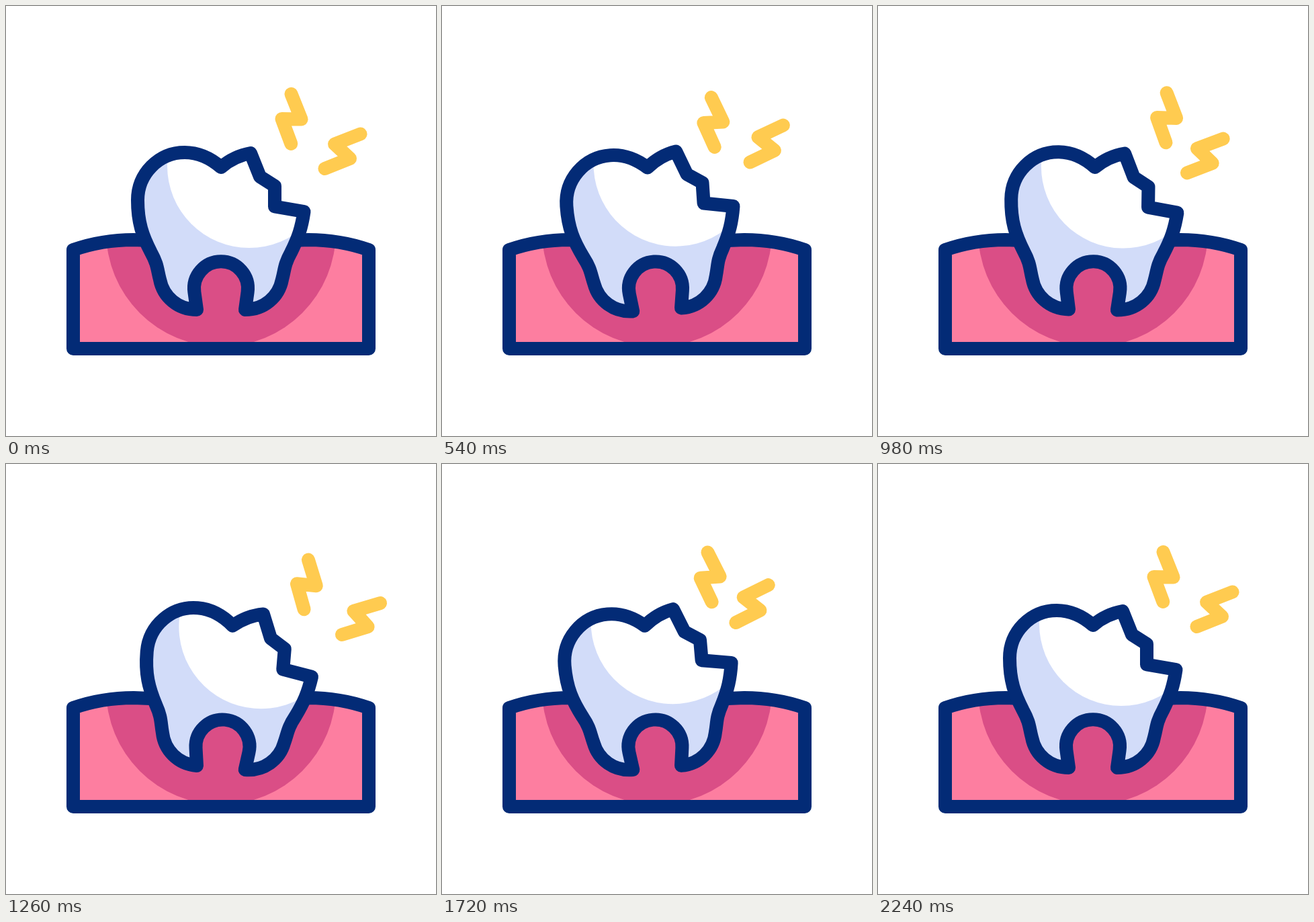
Recreate the animation shown at these times as an HTML page with a canvas. Size 640x640 px, loop 2400 ms.

```html
<!DOCTYPE html>
<html lang="en">
<head>
<meta charset="utf-8">
<title>Broken tooth</title>
<style>
html, body { margin: 0; width: 100%; height: 100%; overflow: hidden; background: #fff; }
canvas { display: block; width: 100vw; height: 100vh; object-fit: contain; }
</style>
</head>
<body>
<canvas id="stage" width="640" height="640"></canvas>
<script>
const ctx = document.getElementById('stage').getContext('2d');
const LOOP = 2400, STEP = 20;
const NAVY = '#032b76', PINK = '#fd7ea0', ROSE = '#da4e86';
const SHADE = '#d2dcf9', YELLOW = '#ffcb50';
const PIVOT = { x: 320, y: 450 };

// Keys are [time in ms, value]
const SWING = [[200, 0], [690, -5], [1215, 5], [1687, -5], [2240, 0]];

const BOLTS = [
  {
    path: new Path2D('M424.5 131 L439.5 168.5 L410.5 168 L424.3 205'),
    dir: [-0.224, 0.975],
    keys: [[290, 0], [750, 20.5], [1070, -9], [1530, 20.5], [1870, 0]]
  },
  {
    path: new Path2D('M527.5 190.5 L489 205.5 L512 227 L474.5 242'),
    dir: [-0.968, 0.25],
    keys: [[460, 0], [920, 20.5], [1245, -9], [1770, 20.5], [2080, 0]]
  }
];

const gum = new Path2D(
  'M100 510 L100 363 Q143 348 190 348 L215 349 L425 349 L450 348 Q497 348 540 363 L540 510 Z');

const tooth = new Path2D(
  'M364 219 C347 222 333 229 320 240 C305 227 287 218 266 218 ' +
  'C227 218 196 250 196 289 C196 322 203 342 216 367 ' +
  'C226 385 225 392 229 407 C234 433 256 452 284 452 ' +
  'L280.4 426 A40 40 0 1 1 359.6 426 L356 452 ' +
  'C384 452 406 433 411 407 C415 392 414 385 424 367 ' +
  'C435 345 440 330 443.5 306 L400 298.5 L400 268 L378 254 Z');

function valueAt(keys, t) {
  if (t <= keys[0][0]) return keys[0][1];
  for (let i = 1; i < keys.length; i++) {
    const [t0, a] = keys[i - 1], [t1, b] = keys[i];
    if (t < t1) {
      const u = (t - t0) / (t1 - t0);
      return a + (b - a) * u * u * (3 - 2 * u);
    }
  }
  return keys[keys.length - 1][1];
}

function disc(x, y, r, color) {
  ctx.fillStyle = color;
  ctx.beginPath();
  ctx.arc(x, y, r, 0, Math.PI * 2);
  ctx.fill();
}

// Fills a shape, adds a clipped disc inside it, then outlines it
function drawShape(path, base, x, y, r, inner) {
  ctx.save();
  ctx.clip(path);
  ctx.fillStyle = base;
  ctx.fillRect(0, 0, 640, 640);
  disc(x, y, r, inner);
  ctx.restore();
  ctx.strokeStyle = NAVY;
  ctx.stroke(path);
}

function draw(t) {
  ctx.fillStyle = '#fff';
  ctx.fillRect(0, 0, 640, 640);
  ctx.lineWidth = 20;
  ctx.lineCap = ctx.lineJoin = 'round';

  drawShape(gum, PINK, 320, 336, 171, ROSE);

  ctx.save();
  ctx.translate(PIVOT.x, PIVOT.y);
  ctx.rotate(valueAt(SWING, t) * Math.PI / 180);
  ctx.translate(-PIVOT.x, -PIVOT.y);
  drawShape(tooth, SHADE, 362, 238, 122, '#fff');

  ctx.strokeStyle = YELLOW;
  for (const { path, dir, keys } of BOLTS) {
    const d = valueAt(keys, t);
    ctx.save();
    ctx.translate(dir[0] * d, dir[1] * d);
    ctx.stroke(path);
    ctx.restore();
  }
  ctx.restore();
}

const start = performance.now();
function frame() {
  const t = (performance.now() - start) % LOOP;
  draw(Math.floor(t / STEP) * STEP);
  requestAnimationFrame(frame);
}
frame();
</script>
</body>
</html>
```
